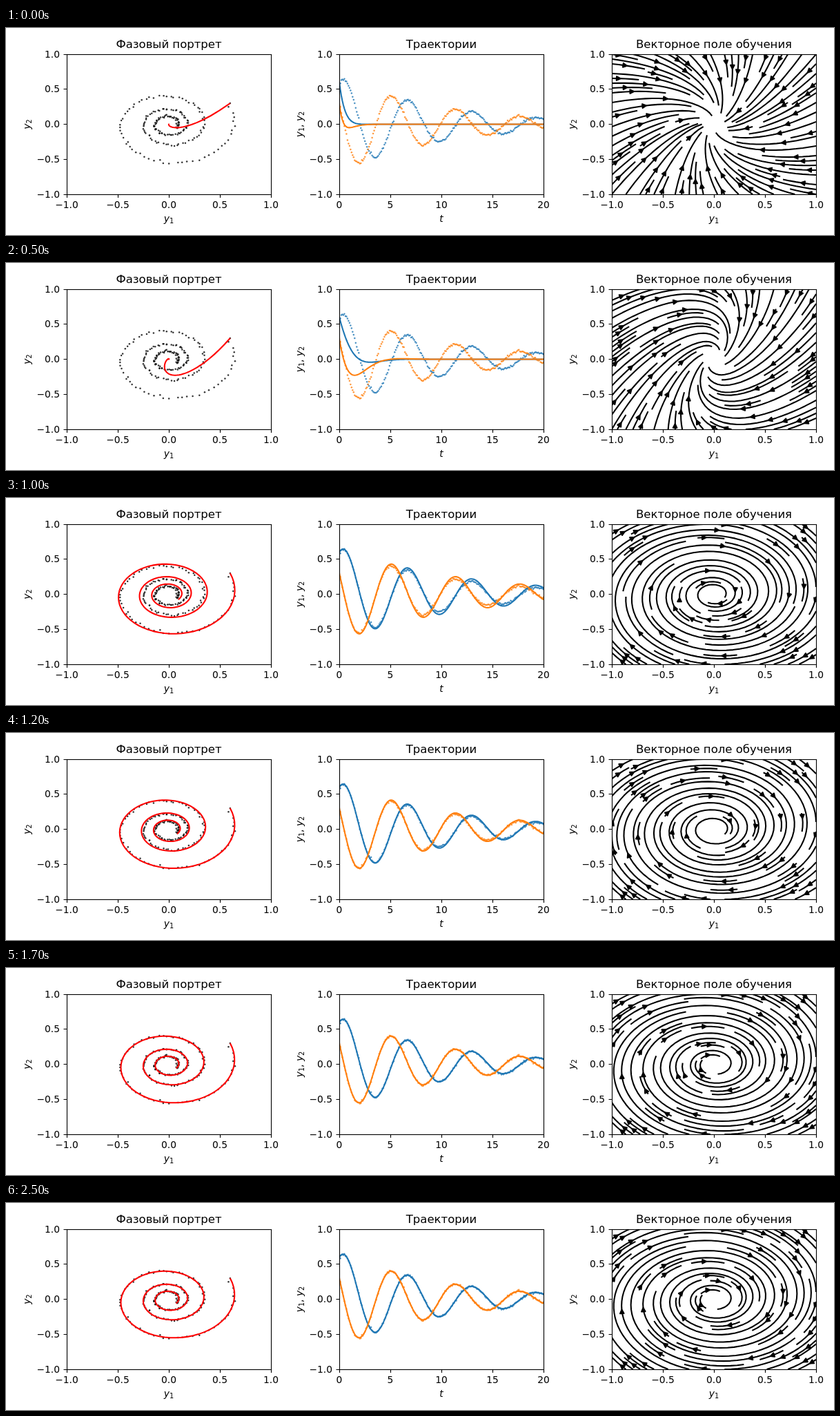
An HTML page with a canvas that plays this animation: 1200x300 px, repeating every 2600 ms.

```html
<!DOCTYPE html>
<html lang="ru">
<head>
<meta charset="utf-8">
<style>
  html, body { margin: 0; width: 100%; height: 100%; overflow: hidden; background: #fff; }
  canvas { display: block; }
</style>
</head>
<body>
<canvas id="stage" width="1200" height="300"></canvas>
<script>
const ctx = document.getElementById('stage').getContext('2d');
const STEP_MS = 100, STEPS = 26;
const WIDTH = 296, HEIGHT = 203, TOP = 38, BOTTOM = TOP + HEIGHT;
const LEFTS = [88, 483, 878];
const LINE = 2.08, BLUE = '#1f77b4', ORANGE = '#ff7f0e';
const FONT = '"DejaVu Sans", sans-serif';
const START = [0.6, 0.3], SAMPLES = 200, T_MAX = 20;

// Learned system y' = A y: [step, a11, a12, a21, a22], linear in between.
const LEARNING = [
  [0, -2.1, 0.5, -1.1, -1.7],
  [5, -1.14, 0.46, -1.34, -0.36],
  [8, -0.45, 0.85, -1.2, -0.04],
  [10, -0.09, 1, -1, -0.082],
  [14, -0.1, 0.999, -1, -0.1],
  [25, -0.1, 1, -1, -0.1]
];

function matrixAt(step) {
  const i = Math.max(1, LEARNING.findIndex(key => key[0] >= step));
  const from = LEARNING[i - 1], to = LEARNING[i];
  const k = (step - from[0]) / (to[0] - from[0]);
  return from.slice(1).map((v, j) => v + (to[j + 1] - v) * k);
}

const apply = ([a, b, c, d], [x, y]) => [a * x + b * y, c * x + d * y];

function solve(A) {
  const dt = T_MAX / (SAMPLES - 1), path = [START];
  const move = (p, v, h) => [p[0] + v[0] * h, p[1] + v[1] * h];
  for (let i = 1; i < SAMPLES; i++) {
    const p = path[i - 1];
    const k1 = apply(A, p), k2 = apply(A, move(p, k1, dt / 2));
    const k3 = apply(A, move(p, k2, dt / 2)), k4 = apply(A, move(p, k3, dt));
    path.push(p.map((v, j) => v + dt * (k1[j] + 2 * k2[j] + 2 * k3[j] + k4[j]) / 6));
  }
  return path;
}

let seed = 11;
function random() {
  seed = (seed * 16807) % 2147483647;
  return seed / 2147483647;
}
const noise = () => 0.009 * Math.sqrt(-2 * Math.log(random())) * Math.cos(2 * Math.PI * random());
const observed = solve([-0.1, 1, -1, -0.1])
  .map((p, i) => i ? p.map(v => v + noise()) : p);

// Unit directions on a square grid, interpolated; null next to the undefined centre node.
const CELLS = 20;
function directionField(A) {
  const nodes = [];
  for (let j = 0; j <= CELLS; j++) {
    for (let i = 0; i <= CELLS; i++) {
      const [u, v] = apply(A, [2 * i / CELLS - 1, 2 * j / CELLS - 1]);
      const speed = Math.hypot(u, v);
      nodes.push([u / speed, v / speed]);
    }
  }
  return (x, y) => {
    const i = Math.min(CELLS - 1, Math.floor(x * CELLS)), fx = x * CELLS - i;
    const j = Math.min(CELLS - 1, Math.floor(y * CELLS)), fy = y * CELLS - j;
    const n = j * (CELLS + 1) + i, m = n + CELLS + 1;
    const mix = k => (nodes[n][k] * (1 - fx) + nodes[n + 1][k] * fx) * (1 - fy)
      + (nodes[m][k] * (1 - fx) + nodes[m + 1][k] * fx) * fy;
    const u = mix(0);
    return Number.isNaN(u) ? null : [u, mix(1)];
  };
}

// Streamlines in unit coordinates, spaced by an occupancy mask.
const MASK = 30, MAX_DS = 1 / MASK, MAX_ERROR = 0.003, MAX_LENGTH = 4, MIN_LENGTH = 0.1;
const inside = (x, y) => x >= 0 && x <= 1 && y >= 0 && y <= 1;
const cellOf = (x, y) => Math.floor(y * (MASK - 1) + 0.5) * MASK + Math.floor(x * (MASK - 1) + 0.5);

function spiralCells() {
  const cells = [];
  let x0 = 0, y0 = 1, x1 = MASK - 1, y1 = MASK - 1, x = 0, y = 0, heading = 0;
  for (let i = 0; i < MASK * MASK; i++) {
    cells.push([x, y]);
    if (heading === 0) { if (++x >= x1) { x1--; heading = 1; } }
    else if (heading === 1) { if (++y >= y1) { y1--; heading = 2; } }
    else if (heading === 2) { if (--x <= x0) { x0++; heading = 3; } }
    else if (--y <= y0) { y0++; heading = 0; }
  }
  return cells;
}
const SEEDS = spiralCells();

function streamlines(A) {
  const mask = new Uint8Array(MASK * MASK), lines = [], field = directionField(A);
  let visited, current;

  function enter(x, y) {
    if (!inside(x, y)) return false;
    const cell = cellOf(x, y);
    if (cell === current) return true;
    if (mask[cell]) return false;
    mask[cell] = 1;
    visited.push(cell);
    current = cell;
    return true;
  }

  function trace(x, y, sign) {
    const toEdge = (p, v) => v < 0 ? -p / v : v > 0 ? (1 - p) / v : Infinity;
    const points = [];
    let ds = MAX_DS, length = 0;
    while (true) {
      points.push([x, y]);
      const a = field(x, y);
      if (!a) break;
      const [ax, ay] = a.map(v => v * sign);
      const nextX = x + ds * ax, nextY = y + ds * ay;
      if (!inside(nextX, nextY)) {
        const rest = Math.min(toEdge(x, ax), toEdge(y, ay));
        points.push([x + ax * rest, y + ay * rest]);
        length += rest;
        break;
      }
      const b = field(nextX, nextY);
      if (!b) break;
      const [bx, by] = b.map(v => v * sign);
      const error = ds / 2 * Math.hypot(bx - ax, by - ay);
      if (error < MAX_ERROR) {
        x += ds * (ax + bx) / 2;
        y += ds * (ay + by) / 2;
        if (!enter(x, y) || length + ds > MAX_LENGTH) break;
        length += ds;
      }
      ds = error ? Math.min(MAX_DS, 0.85 * ds * Math.sqrt(MAX_ERROR / error)) : MAX_DS;
    }
    return { points, length };
  }

  for (const [mx, my] of SEEDS) {
    if (mask[my * MASK + mx]) continue;
    const x = mx / (MASK - 1), y = my / (MASK - 1);
    visited = [];
    current = -1;
    enter(x, y);
    const back = trace(x, y, -1);
    current = cellOf(x, y);
    const ahead = trace(x, y, 1);
    if (back.length + ahead.length > MIN_LENGTH) {
      lines.push(back.points.reverse().concat(ahead.points.slice(1)));
    } else {
      visited.forEach(cell => mask[cell] = 0);
    }
  }
  return lines;
}

function polyline(points, color) {
  ctx.beginPath();
  points.forEach(p => ctx.lineTo(p[0], p[1]));
  ctx.strokeStyle = color;
  ctx.lineWidth = LINE;
  ctx.lineJoin = 'round';
  ctx.stroke();
}

function dots(points, color) {
  ctx.fillStyle = color;
  ctx.globalAlpha = 0.8;
  for (const [x, y] of points) {
    ctx.beginPath();
    ctx.arc(x, y, 1.25, 0, 2 * Math.PI);
    ctx.fill();
  }
  ctx.globalAlpha = 1;
}

function arrow(points) {
  const sums = [];
  for (let i = 1, s = 0; i < points.length; i++) {
    const [p, q] = [points[i - 1], points[i]];
    s += Math.hypot((q[0] - p[0]) / WIDTH, (q[1] - p[1]) / HEIGHT);
    sums.push(s);
  }
  const n = sums.findIndex(s => s >= sums[sums.length - 1] / 2);
  const [p, q] = [points[n], points[n + 1]];
  ctx.save();
  ctx.translate((p[0] + q[0]) / 2, (p[1] + q[1]) / 2);
  ctx.rotate(Math.atan2(q[1] - p[1], q[0] - p[0]));
  ctx.beginPath();
  ctx.moveTo(-2.33, 0);
  ctx.lineTo(-7.89, 2.78);
  ctx.lineTo(-7.89, -2.78);
  ctx.closePath();
  ctx.fillStyle = '#000';
  ctx.fill();
  ctx.stroke();
  ctx.restore();
}

function text(string, x, y, align = 'center', size = 13.8) {
  ctx.font = `${size}px ${FONT}`;
  ctx.textAlign = align;
  ctx.fillText(string, x, y);
}

// Runs are [text, style]; style is 'i' (italic), 's' (subscript) or 'n' (plain).
function mathLabel(runs, x, y, angle = 0) {
  const fonts = { i: `italic 13.89px ${FONT}`, s: `9.72px ${FONT}`, n: `13.89px ${FONT}` };
  const widths = runs.map(([string, style]) => {
    ctx.font = fonts[style];
    return ctx.measureText(string).width;
  });
  ctx.save();
  ctx.translate(x, y);
  ctx.rotate(angle);
  ctx.textAlign = 'left';
  let at = -widths.reduce((a, b) => a + b) / 2;
  runs.forEach(([string, style], i) => {
    ctx.font = fonts[style];
    ctx.fillText(string, at, style === 's' ? 2.2 : 0);
    at += widths[i];
  });
  ctx.restore();
}

const Y1 = [['y', 'i'], ['1', 's']], Y2 = [['y', 'i'], ['2', 's']];
const UNIT_TICKS = ['−1.0', '−0.5', '0.0', '0.5', '1.0'];
const PANELS = [
  { title: 'Фазовый портрет', ticks: UNIT_TICKS, xLabel: Y1, yLabel: Y2 },
  { title: 'Траектории', ticks: ['0', '5', '10', '15', '20'], xLabel: [['t', 'i']],
    yLabel: [...Y1, [', ', 'n'], ...Y2] },
  { title: 'Векторное поле обучения', ticks: UNIT_TICKS, xLabel: Y1, yLabel: Y2 }
];

const snap = v => Math.floor(v) + 0.5;

function drawAxes({ title, ticks, xLabel, yLabel }, left) {
  const middle = left + WIDTH / 2;
  ctx.strokeStyle = ctx.fillStyle = '#000';
  ctx.lineWidth = 1.11;
  ctx.lineJoin = 'miter';
  ctx.strokeRect(snap(left), snap(TOP), WIDTH, HEIGHT);
  ctx.beginPath();
  ticks.forEach((label, i) => {
    const x = left + i * WIDTH / 4, y = snap(BOTTOM - i * HEIGHT / 4);
    ctx.moveTo(snap(x), BOTTOM);
    ctx.lineTo(snap(x), BOTTOM + 5);
    ctx.moveTo(left, y);
    ctx.lineTo(left - 4.5, y);
    text(label, x, 261);
    text(UNIT_TICKS[i], left - 10, y + 4.5, 'right');
  });
  ctx.stroke();
  text(title, middle, 29, 'center', 16.5);
  mathLabel(xLabel, middle, 281);
  mathLabel(yLabel, left - 53.5, TOP + HEIGHT / 2, -Math.PI / 2);
}

function clipped(left, draw) {
  ctx.save();
  ctx.beginPath();
  ctx.rect(left, TOP, WIDTH, HEIGHT);
  ctx.clip();
  draw();
  ctx.restore();
}

const toY = v => TOP + HEIGHT * (1 - v) / 2;
const phase = path => path.map(([x, y]) => [LEFTS[0] + WIDTH * (x + 1) / 2, toY(y)]);
const series = (path, j) => path.map((p, i) => [LEFTS[1] + WIDTH * i / (SAMPLES - 1), toY(p[j])]);

function drawStep(step) {
  const A = matrixAt(step), path = solve(A);
  ctx.fillStyle = '#fff';
  ctx.fillRect(0, 0, 1200, 300);
  clipped(LEFTS[0], () => {
    dots(phase(observed), '#000');
    polyline(phase(path), '#f00');
  });
  clipped(LEFTS[1], () => {
    [BLUE, ORANGE].forEach((color, j) => dots(series(observed, j), color));
    [BLUE, ORANGE].forEach((color, j) => polyline(series(path, j), color));
  });
  clipped(LEFTS[2], () => {
    for (const line of streamlines(A)) {
      const points = line.map(([x, y]) => [LEFTS[2] + WIDTH * x, BOTTOM - HEIGHT * y]);
      polyline(points, '#000');
      arrow(points);
    }
  });
  PANELS.forEach((panel, i) => drawAxes(panel, LEFTS[i]));
}

let shown = -1;
const begin = performance.now();
function tick() {
  const step = Math.floor((performance.now() - begin) / STEP_MS) % STEPS;
  if (step !== shown) drawStep(shown = step);
  requestAnimationFrame(tick);
}
tick();
</script>
</body>
</html>
```
